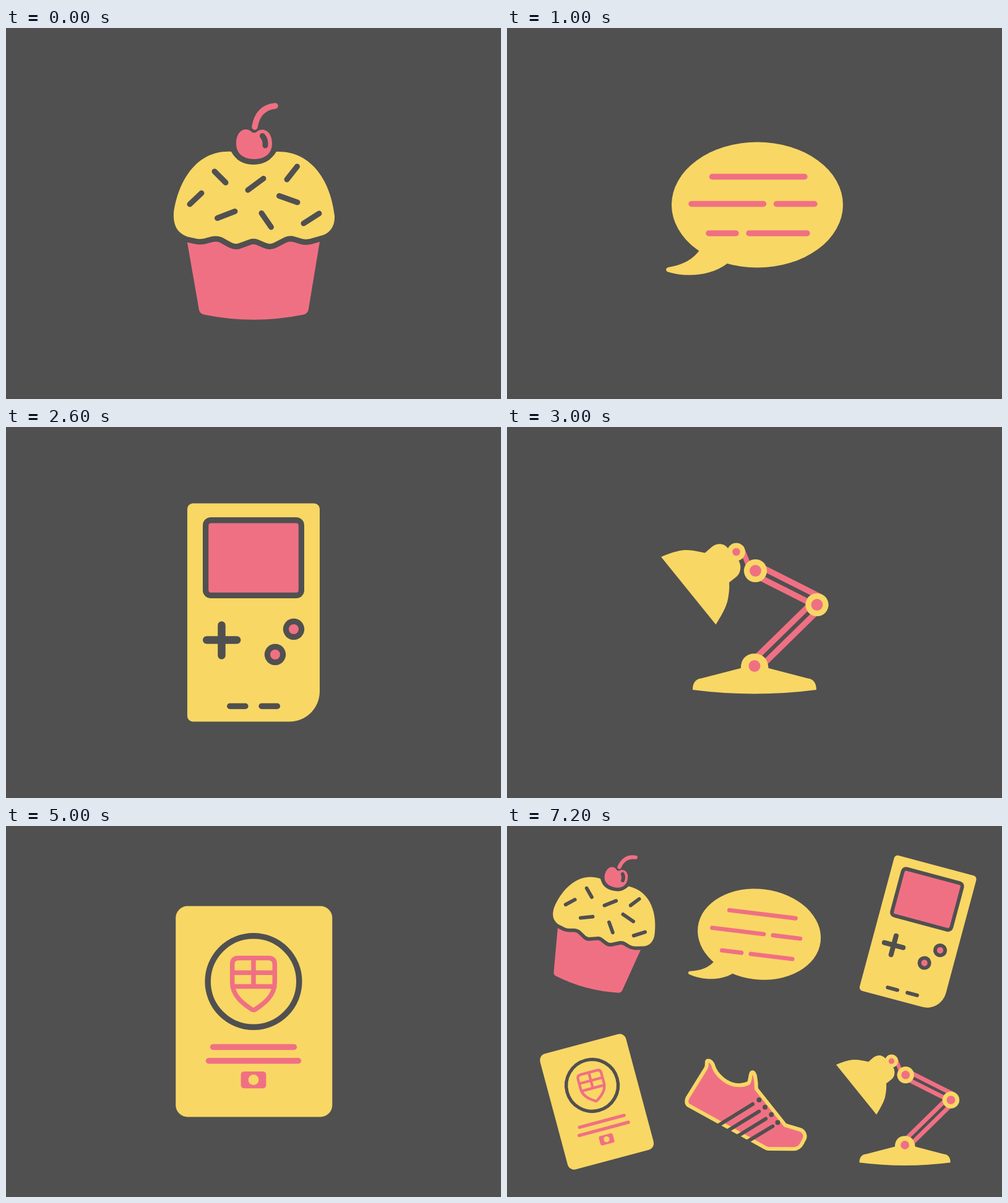
These frames come from a looping animation (800 by 600 pixels, 8000 ms). An HTML page with a canvas:

```html
<!DOCTYPE html>
<html lang="en">
<head>
<meta charset="utf-8">
<title>Icon set</title>
<style>
html, body { margin: 0; width: 100%; height: 100%; overflow: hidden; background: #505050; }
canvas { display: block; }
</style>
</head>
<body>
<canvas id="stage" width="800" height="600"></canvas>
<script>
const ctx = document.getElementById('stage').getContext('2d');
const GREY = '#505050', YELLOW = '#f9d765', PINK = '#f07083';
const LOOP = 8000, STEP = 1000;

function fill(color, d) {
  ctx.fillStyle = color;
  ctx.fill(new Path2D(d));
}

function stroke(color, width, d, cap = 'round') {
  ctx.strokeStyle = color;
  ctx.lineWidth = width;
  ctx.lineCap = cap;
  ctx.lineJoin = 'round';
  ctx.stroke(new Path2D(d));
}

function disc(color, x, y, rx, ry = rx) {
  ctx.fillStyle = color;
  ctx.beginPath();
  ctx.ellipse(x, y, rx, ry, 0, 0, 2 * Math.PI);
  ctx.fill();
}

function box(color, x, y, w, h, radii) {
  ctx.fillStyle = color;
  ctx.beginPath();
  ctx.roundRect(x, y, w, h, radii);
  ctx.fill();
}

// Two parallel bars on either side of an axis
function twinBars(x1, y1, x2, y2) {
  const len = Math.hypot(x2 - x1, y2 - y1);
  for (const gap of [-8, 8]) {
    const dx = -(y2 - y1) / len * gap, dy = (x2 - x1) / len * gap;
    stroke(PINK, 9.5, `M${x1 + dx} ${y1 + dy}L${x2 + dx} ${y2 + dy}`, 'butt');
  }
}

function joint(x, y, outer, inner) {
  disc(YELLOW, x, y, outer);
  disc(PINK, x, y, inner);
}

function cupcake() {
  const icing = 'M364 200C308 197 278 248 271 300C270 325 282 333 293 337.5L308 340.7' +
    'Q314 342 320 340.5L332 337.3Q341 335 349 338.5L365 347.3Q371.5 350.5 378 347.5' +
    'L393 342Q400 339.5 407 342L420 347.5Q427 350.5 433 347.2L451 338Q459 335 467 337.5' +
    'L478 340.8Q484 342.5 491 341L512 335C524 331 532 320 531 303C525 250 495 198 437 200' +
    'C428 214 418 220.5 400 221C382 220.5 372 214 364 200Z';
  fill(PINK, 'M290.4 332L312 456Q313.5 462 320 463.5Q400 480 481 463.5Q487 462 488.7 456L509.3 332Z');
  stroke(GREY, 18, icing);
  fill(YELLOW, icing);
  stroke(GREY, 9, 'M297 285L316 267M337 232L355 250M391 262L416 243.5M454 245L470.5 224' +
    'M341.5 307.5L370 296.5M413 299.5L428.5 322M441.5 271.5L471 282M481 316L506 300');
  fill(PINK, 'M394.5 166Q401 173 407.5 166C416 161.5 430 166 430 187C430 204 417 212 401 212' +
    'C385 212 372 204 372 187C372 166 386 160.5 394.5 166Z');
  stroke(GREY, 9, 'M414.5 174.5Q420 181 419 190');
  stroke(PINK, 9.5, 'M402 160Q407 129 435 126');
}

function bubble() {
  disc(YELLOW, 404.5, 286, 138.5, 101.5);
  fill(YELLOW, 'M312 358Q297 381 261 387C256 388 256 393 260 394.5C287 403 328 402 356 381Z');
  stroke(PINK, 9.5, 'M331.5 240.5H481M298 284.5H414.5M435.5 284.5H497M326 332H370M391 332H485');
}

function handheld() {
  box(YELLOW, 293, 123.5, 214, 353, [9, 9, 49, 9]);
  box(GREY, 318, 146, 164, 131, 13);
  box(PINK, 327.3, 155.4, 145.5, 112.3, 4);
  stroke(GREY, 12.5, 'M348.5 320.5V369.5M324.3 344.5H373.2');
  for (const [x, y] of [[465, 327], [435, 368]]) {
    disc(GREY, x, y, 17.2);
    disc(PINK, x, y, 8);
  }
  stroke(GREY, 9.3, 'M361.7 451.5H387M413 451.5H438.5');
}

function lamp() {
  twinBars(400, 386.5, 501, 287.5);
  twinBars(402, 231, 501, 281);
  stroke(PINK, 8.5, 'M378.2 194L394 232', 'butt');
  fill(YELLOW, 'M249 210C270 201 282 199 290 199C300 199 312 202 320 203.5L331 194' +
    'C338 188 350 187 357 196L375 217C379 225 378 236 371 242L359 251.5' +
    'C360 262 358 275 356 283C352 296 345 307 337.5 319.5Z');
  fill(YELLOW, 'M300 425C300 413 306 407 314 406.5L378 390C378 374 388 366.5 400 366.5' +
    'C412 366.5 422 374 422.5 390L486 406.5C494 407 500 413 500 425Q400 438 300 425Z');
  disc(PINK, 400, 386.5, 9.4);
  joint(370.5, 202, 14.5, 6.3);
  joint(401.5, 232.5, 18.6, 9.4);
  joint(501, 287.5, 18.6, 9.4);
}

function shoe() {
  const upper = 'M286 184C286 178 296 180 301 190C309 220 340 243 368 243C378 243 386 240 391 237.5' +
    'C396 234 395 215 399 211C404 207 408 216 409 226C410.5 234 411 244 411 252L484 344L521 355' +
    'C531 358 536 369 533 377L527 389C522 399 514 404 505 404L443 403.5Q438 403.5 434 401L240 294' +
    'C234 290 234 282 237 275L283 201C287 195 286 189 286 184Z';
  fill(PINK, upper);
  stroke(YELLOW, 9.4, upper);
  stroke(GREY, 9.2, 'M402 290.5L310.5 347M418 309L334.5 360.5M435 327.5L359.5 374M452.5 346.5L383.5 388');
  for (const [x, y] of [[418, 280], [433, 298.5], [449, 317], [465, 337]]) disc(GREY, x, y, 6.2);
}

function passport() {
  box(YELLOW, 274.3, 129.6, 253, 340.8, 19);
  ctx.strokeStyle = GREY;
  ctx.lineWidth = 9.5;
  ctx.beginPath();
  ctx.arc(400, 251.5, 73.8, 0, 2 * Math.PI);
  ctx.stroke();
  stroke(PINK, 7.5, 'M376 213.5H424Q434.3 213.5 434.3 223.5V253C434.3 275 416 288 403 296.5' +
    'Q400 298.5 397 296.5C384 288 365.7 275 365.7 253V223.5Q365.7 213.5 376 213.5Z' +
    'M400 213.5V259.5M366 237.3H434M366 259.5H434');
  stroke(PINK, 9.4, 'M334.5 357.5H465.5M327.5 379.7H472.5');
  box(PINK, 379.6, 397, 40.8, 27.3, 5);
  disc(YELLOW, 400, 410.5, 8.4);
}

// Scale, turn in degrees and offset of each icon in the closing group
const icons = [
  [cupcake, 0.648, 15, -43.3, -101.1],
  [bubble, 0.721, 7, 143.3, -65.1],
  [handheld, 0.642, 15, 466, -79],
  [lamp, 0.736, 0, 348.7, 231.5],
  [shoe, 0.64, 0, 139.9, 263.8],
  [passport, 0.568, -15, -118.8, 340.3]
];

function drawGroup() {
  for (const [draw, scale, turn, x, y] of icons) {
    ctx.save();
    ctx.translate(x, y);
    ctx.rotate(turn * Math.PI / 180);
    ctx.scale(scale, scale);
    draw();
    ctx.restore();
  }
}

const start = performance.now();

function frame() {
  const scene = Math.floor((performance.now() - start) % LOOP / STEP);
  ctx.fillStyle = GREY;
  ctx.fillRect(0, 0, 800, 600);
  if (scene < icons.length) icons[scene][0]();
  else drawGroup();
  requestAnimationFrame(frame);
}
frame();
</script>
</body>
</html>
```
